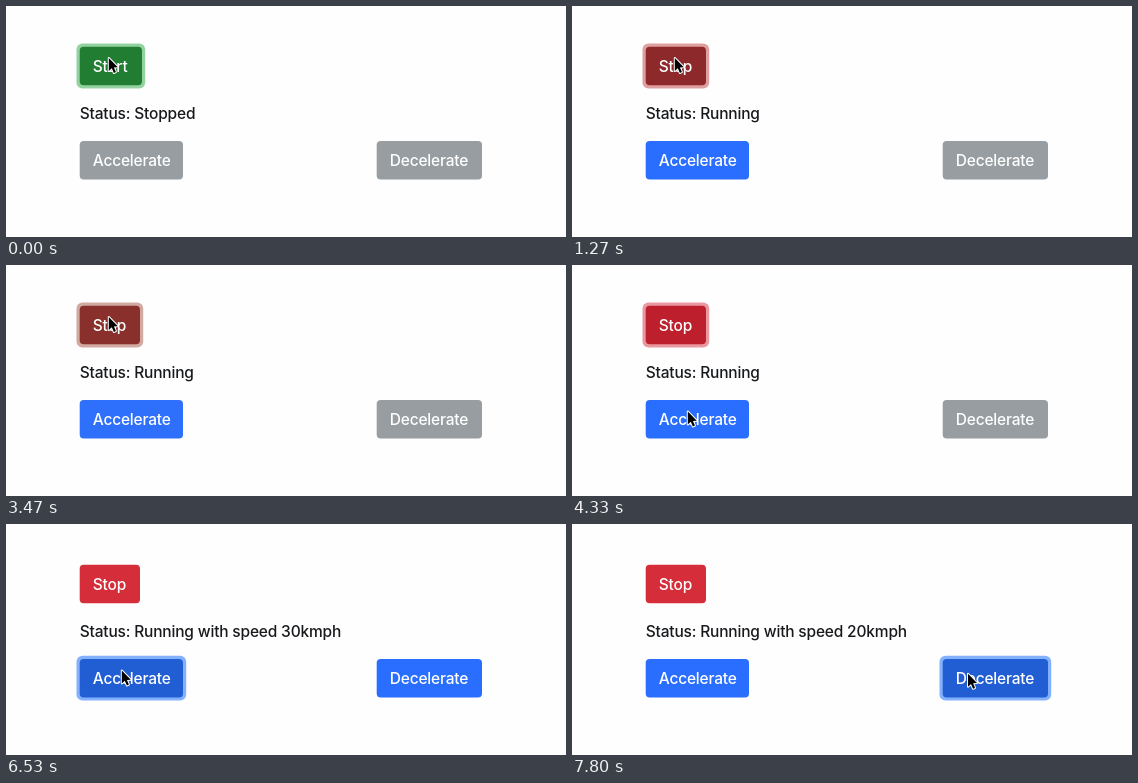
An HTML page with a canvas for the animation above (8 s loop, 560 by 231 pixels).

```html
<!DOCTYPE html>
<html lang="en">
<head>
<meta charset="utf-8">
<title>Start and stop buttons</title>
<style>
html, body { margin: 0; width: 100%; height: 100%; overflow: hidden; background: #fefefe; }
canvas { display: block; width: 560px; height: 231px; }
</style>
</head>
<body>
<canvas id="stage"></canvas>
<script>
const W = 560, H = 231, LOOP = 8000, FPS = 15, FADE = 150;
const LEFT = 73.7, BUTTON_H = 38.4, RING = 3.2;
const canvas = document.getElementById('stage');
const ctx = canvas.getContext('2d');
const scale = window.devicePixelRatio || 1;
canvas.width = W * scale;
canvas.height = H * scale;

const GREEN = [32, 125, 50], GREEN_DOWN = [29, 111, 46];
const RED = [214, 45, 59], RED_FOCUS = [190, 31, 45], RED_DOWN = [164, 28, 42];
const BLUE = [41, 110, 255], BLUE_FOCUS = [34, 94, 211];
const GRAY = [151, 157, 161];
const GREEN_RING = [40, 167, 69], RED_RING = [214, 53, 69], BLUE_RING = [10, 103, 255];

const clamp = v => Math.min(1, Math.max(0, v));
const smooth = p => p * p * (3 - 2 * p);
const fade = (t, start) => smooth(clamp((t - start) / FADE));
const lerp = (a, b, p) => a + (b - a) * p;
const mix = (a, b, p) => a.map((v, i) => lerp(v, b[i], p));
const rgb = (c, alpha = 1) => `rgba(${c.map(Math.round).join()},${alpha})`;

// Each entry fades to a new value from its start time.
function track(t, first, steps) {
  return steps.reduce((c, [start, next]) => mix(c, next, fade(t, start)), first);
}

// The last entry whose time has come.
const latest = (t, list) => list.filter(([start]) => t >= start).pop()[1];

const LABELS = [[0, 'Start'], [1190, 'Stop'], [2490, 'Start'], [3385, 'Stop']];
const STATUS = [
  [0, 'Stopped'], [1190, 'Running'], [2490, 'Stopped'], [3385, 'Running'],
  [4590, 'Running with speed 10kmph'], [5390, 'Running with speed 20kmph'],
  [6525, 'Running with speed 30kmph'], [7390, 'Running with speed 20kmph']
];
const TOGGLE = [
  [990, GREEN_DOWN], [1155, RED_DOWN], [1280, RED_FOCUS],
  [2480, GREEN_DOWN], [2610, GREEN], [3360, RED_DOWN], [3480, RED_FOCUS], [4580, RED]
];
const TOGGLE_RING = [[1150, RED_RING], [2500, GREEN_RING], [3370, RED_RING]];
const ACCEL = [
  [1110, BLUE], [2492, GRAY], [3335, BLUE], [4580, BLUE_FOCUS], [7380, BLUE]
];
const DECEL = [[4580, BLUE], [7380, BLUE_FOCUS]];

// Time, x, y of the pointer tip.
const POINTER = [
  [0, 102.8, 52], [3660, 102.8, 52], [4200, 113, 141], [4330, 115.8, 146.5],
  [6600, 115.8, 146.5], [7000, 416, 150], [7200, 396, 149.8], [LOOP, 396, 149.8]
];

function pointerAt(t) {
  const i = POINTER.findIndex(p => p[0] > t);
  const [t0, x0, y0] = POINTER[i - 1], [t1, x1, y1] = POINTER[i];
  const p = smooth((t - t0) / (t1 - t0));
  return [lerp(x0, x1, p), lerp(y0, y1, p)];
}

function box(x, y, w, h, r, fill) {
  ctx.fillStyle = fill;
  ctx.beginPath();
  ctx.roundRect(x, y, w, h, r);
  ctx.fill();
}

function write(text, x, y, color) {
  ctx.font = '500 15.5px Inter, Roboto, sans-serif';
  ctx.letterSpacing = '-0.18px';
  ctx.fillStyle = color;
  ctx.fillText(text, x, y);
}

function button(text, x, y, w, color, ring, ringLevel) {
  if (ringLevel > 0) {
    box(x - RING, y - RING, w + 2 * RING, BUTTON_H + 2 * RING, 6, rgb(ring, 0.5 * ringLevel));
  }
  box(x, y, w, BUTTON_H, 4, rgb(color));
  write(text, x + 13, y + 25, '#fff');
}

function drawPointer(x, y) {
  ctx.save();
  ctx.translate(x, y);
  ctx.beginPath();
  ctx.moveTo(0, 0);
  [[0, 13], [3, 10.3], [5.1, 15], [7.1, 14.1], [5.1, 9.5], [9, 9.3]]
    .forEach(([px, py]) => ctx.lineTo(px, py));
  ctx.closePath();
  ctx.lineJoin = 'round';
  ctx.lineWidth = 2;
  ctx.strokeStyle = '#fff';
  ctx.stroke();
  ctx.fillStyle = '#000';
  ctx.fill();
  ctx.restore();
}

function draw(t) {
  ctx.setTransform(scale, 0, 0, scale, 0, 0);
  ctx.fillStyle = '#fefefe';
  ctx.fillRect(0, 0, W, H);

  const label = latest(t, LABELS);
  button(label, LEFT, 40.8, label === 'Start' ? 62.3 : 60.3, track(t, GREEN, TOGGLE),
    track(t, GREEN_RING, TOGGLE_RING), 1 - fade(t, 4580));
  write('Status: ' + latest(t, STATUS), LEFT, 113, '#17191c');
  button('Accelerate', LEFT, 135, 103.3, track(t, GRAY, ACCEL),
    BLUE_RING, fade(t, 4580) - fade(t, 7380));
  button('Decelerate', 370.7, 135, 105.3, track(t, GRAY, DECEL),
    BLUE_RING, fade(t, 7380));
  drawPointer(...pointerAt(t));
}

// The picture advances in steps of 1/15 s.
function tick() {
  const t = performance.now() % LOOP;
  draw(Math.floor((t + 5) * FPS / 1000) * 1000 / FPS % LOOP);
  requestAnimationFrame(tick);
}
tick();
</script>
</body>
</html>
```
